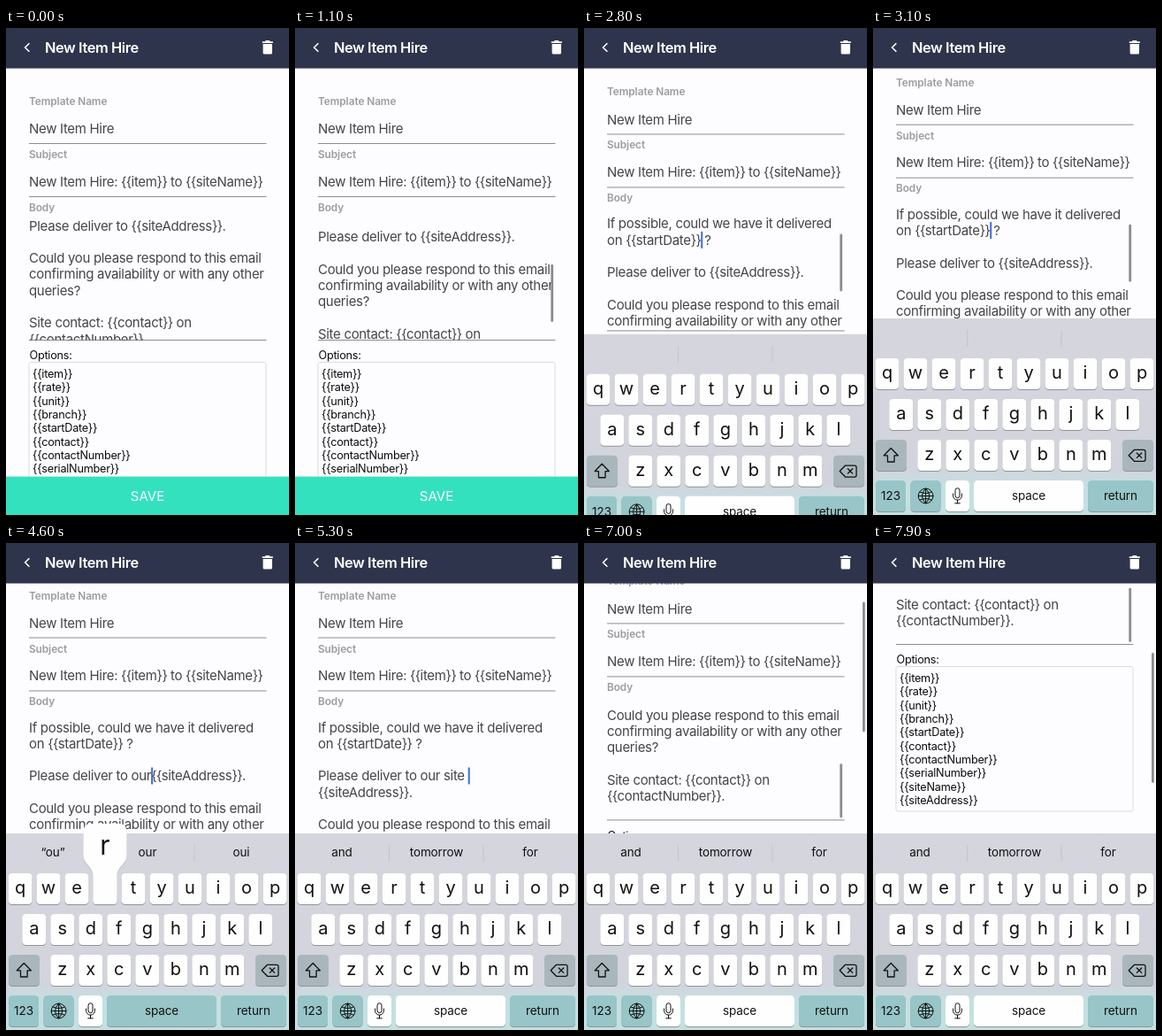
Animation of 320x550 px, one loop 8 s. Source, as an HTML page:

```html
<!DOCTYPE html>
<html lang="en">
<head>
<meta charset="utf-8">
<title>Edit template</title>
<style>
  html, body { margin: 0; width: 100%; height: 100%; overflow: hidden; background: #fdfcfe; }
  svg { display: block; width: 320px; height: 550px; }
  text { font-family: Inter, Roboto, sans-serif; white-space: pre; }
  .title { font-size: 16.4px; font-weight: 600; letter-spacing: -.42px; fill: #fff; }
  .label { font-size: 11.8px; font-weight: 600; letter-spacing: -.05px; fill: #9c9b9f; }
  .field { font-size: 15px; letter-spacing: -.32px; fill: #454447; }
  .field .brace { letter-spacing: -.62px; }
  .option { font-size: 12.7px; letter-spacing: -.25px; fill: #0c0c0d; }
  .save { font-size: 15px; fill: #fff; text-anchor: middle; }
  .key { font-size: 20px; fill: #111; text-anchor: middle; }
  .word { font-size: 13.5px; letter-spacing: -.1px; fill: #111; text-anchor: middle; }
  .big { font-size: 30px; fill: #111; text-anchor: middle; }
  .icon { fill: none; stroke: #111; stroke-width: 1.3; stroke-linejoin: round; stroke-linecap: round; }
  .thin { stroke-width: 1; }
</style>
</head>
<body>
<svg id="stage" viewBox="0 0 320 550">
  <defs>
    <clipPath id="bodyClip"><rect x="20" y="214.5" width="280" height="138"/></clipPath>
    <linearGradient id="board" x1="0" y1="328" x2="0" y2="550" gradientUnits="userSpaceOnUse">
      <stop offset="0" stop-color="#d5d5de"/>
      <stop offset=".76" stop-color="#d2d4dc"/>
      <stop offset=".85" stop-color="#c5dfe1"/>
      <stop offset="1" stop-color="#c3e1e1"/>
    </linearGradient>
  </defs>
  <rect width="320" height="550" fill="#fdfcfe"/>
  <g id="page">
    <g id="form"></g>
    <g clip-path="url(#bodyClip)">
      <g id="lines"></g>
      <rect id="caret" width="2" height="19" fill="#3d6be0"/>
    </g>
    <rect id="bodyBar" x="289.3" width="2.8" rx="1.4" fill="#8c8c8f"/>
  </g>
  <rect id="pageBar" x="315" width="2.8" height="147" rx="1.4" fill="#8c8c8f"/>
  <rect width="320" height="45.6" fill="#2e344b"/>
  <path d="M26.4 17.3l-4.8 4.7 4.8 4.7" fill="none" stroke="#fff" stroke-width="1.6"/>
  <text class="title" x="44" y="28">New Item Hire</text>
  <path d="M289.8 15.2h3l1-1.2h4l1 1.2h3v1.7h-12zM290.6 18h10.4v10q0 1.6-1.6 1.6h-7.2q-1.6 0-1.6-1.6z" fill="#fff"/>
  <rect y="506.6" width="320" height="43.4" fill="#34e1bf"/>
  <text class="save" x="160" y="534">SAVE</text>
  <g id="keyboard"></g>
</svg>
<script>
const LOOP = 8000, LINE = 18.3, TOP = 214, VIEW = 138;
const $ = id => document.getElementById(id);

function add(parent, tag, attrs, text) {
  const el = document.createElementNS('http://www.w3.org/2000/svg', tag);
  for (const k in attrs) el.setAttribute(k, attrs[k]);
  if (text !== undefined) el.textContent = text;
  parent.appendChild(el);
  return el;
}
const label = (parent, cls, x, y, text) => add(parent, 'text', { class: cls, x, y }, text);
const set = (el, attrs) => { for (const k in attrs) el.setAttribute(k, attrs[k]); };
const setText = (el, s) => { if (el.textContent !== s) el.textContent = s; };

// Field text sets its braces a little tighter
function setField(el, s) {
  if (el.textContent === s) return;
  el.textContent = '';
  for (const part of s.split(/(\{\{|\}\})/))
    if (part) add(el, 'tspan', /[{}]/.test(part) ? { class: 'brace' } : {}, part);
}
function field(parent, y, s) {
  const el = label(parent, 'field', 26, y, '');
  setField(el, s);
  return el;
}

// Form
const form = $('form');
[['Template Name', 87], ['Subject', 147], ['Body', 206.5]].forEach(([s, y]) => label(form, 'label', 26, y, s));
field(form, 119.2, 'New Item Hire');
field(form, 178.8, 'New Item Hire: {{item}} to {{siteName}}');
[130.5, 190.5, 352.5].forEach(y => add(form, 'path', { d: `M26 ${y}h268.5`, stroke: '#8d8c90' }));
label(form, 'option', 26.5, 374.3, 'Options:');
add(form, 'rect', { x: 26, y: 377.5, width: 268, height: 163.5, rx: 2, fill: 'none', stroke: '#dcdbdf' });
['item', 'rate', 'unit', 'branch', 'startDate', 'contact', 'contactNumber', 'serialNumber', 'siteName', 'siteAddress']
  .forEach((s, i) => label(form, 'option', 30, 394.8 + i * 15.35, `{{${s}}}`));

// Keyboard
const kb = $('keyboard');
const keys = {};
add(kb, 'rect', { y: 328, width: 320, height: 222, fill: 'url(#board)' });
[106.5, 213].forEach(x => add(kb, 'path', { d: `M${x} 341v19`, stroke: '#c3c5cd' }));
const words = [53, 160, 266].map(x => label(kb, 'word', x, 354.3, ''));

function key(x, y, w, fill = '#fefefe') {
  add(kb, 'rect', { x, y: y + 1, width: w, height: 35, rx: 4.3, fill: '#8f959b' });
  return add(kb, 'rect', { x, y, width: w, height: 35, rx: 4.3, fill });
}
[['qwertyuiop', 2.5, 373], ['asdfghjkl', 18.3, 419], ['zxcvbnm', 50.3, 465]].forEach(([row, x0, y]) =>
  [...row].forEach((ch, i) => {
    const x = x0 + i * 32;
    key(x, y, 27);
    label(kb, 'key', x + 13.5, y + 23.4, ch);
    keys[ch] = { x: x + 13.5, y };
  }));
const GREY = '#a9b7bd', TEAL = '#98c5c7';
key(3, 465, 35, GREY);
key(282, 465, 35, GREY);
key(3, 511, 34, TEAL);
key(42.5, 511, 34, TEAL);
key(82, 511, 27);
const space = key(114, 511, 124);
key(243, 511, 74, TEAL);
[[20, '123'], [176, 'space'], [280, 'return']].forEach(([x, s]) => label(kb, 'word', x, 533, s));
const icon = (d, cls = 'icon') => add(kb, 'path', { class: cls, d });
icon('M20.3 474.5l8 8.3h-4.2v7.2h-7.6v-7.2h-4.2z');
icon('M295.5 476.3h10.5q2 0 2 2v9q0 2-2 2h-10.5l-6.3-6.5zM298.3 480l5.4 5.4m0-5.4l-5.4 5.4');
icon('M51.2 528.5a8.4 8.4 0 0 1 16.8 0a8.4 8.4 0 0 1-16.8 0h16.8M59.6 520.1v16.8M59.6 520.1q-8.4 8.4 0 16.8' +
  'q8.4-8.4 0-16.8M53 524q6.6 3 13.2 0M53 533q6.6-3 13.2 0', 'icon thin');
icon('M93 522.2a2.5 2.5 0 0 1 5 0v6a2.5 2.5 0 0 1-5 0zM90.6 526v2.2a4.9 4.9 0 0 0 9.8 0v-2.2M95.5 533.2v3.6M92.7 536.8h5.6', 'icon thin');

const popup = add(kb, 'g', {});
const bubble = 'M-24.5-47q0-9 9-9h31q9 0 9 9v26c0 12-11 12-11 25v27q0 4-4 4h-19q-4 0-4-4v-27c0-13-11-13-11-25z';
add(popup, 'path', { d: bubble, fill: '#9a9fa6', opacity: .5, transform: 'translate(0 1.2)' });
add(popup, 'path', { d: bubble, fill: '#fefefe' });
const popChar = label(popup, 'big', 0, -21, '');

// Timeline: key, pressed at, released at
const typing = [['o', 4300, 4400], ['u', 4400, 4490], ['r', 4500, 4660], [' ', 4580, 4690],
  ['s', 4800, 4890], ['i', 4900, 4990], ['t', 5000, 5090], ['e', 5100, 5190], [' ', 5170, 5260]];
const enteredAt = ([ch, down, up]) => ch === ' ' ? up : down;
const hints = ['', '“o” of on', '“ou” our oui', '“ou” our oui', 'own house site', '“s” so see',
  '“si” since side', '“sit” site sitting', '“site” site sites', 'and tomorrow for'];

const clamp = u => Math.max(0, Math.min(1, u));
const linear = u => u, smooth = u => u * u * (3 - 2 * u);
const easeOut = u => 1 - (1 - u) ** 2, easeIn = u => u * u;

// Keyframes: [time, value, easing into it]
function track(frames, t) {
  let v = frames[0][1];
  for (let i = 1; i < frames.length; i++) {
    const [t0, a] = frames[i - 1], [t1, b, ease = smooth] = frames[i];
    if (t >= t0) v = a + (b - a) * ease(clamp((t - t0) / (t1 - t0)));
  }
  return v;
}
const pageY = [[2700, 0], [3050, 21.3, easeOut], [3150, 21.3], [3300, 23.5]];
pageY.push([6850, 23.5], [7750, 238]);
const bodyY = [[700, 128], [1000, 120, easeIn], [1900, 80, linear], [2350, 64.6, easeOut],
  [5800, 64.6], [6600, 190], [7000, 172]];
const boardY = [[2550, 222], [2900, 0, easeOut]];
const bodyBarFade = [[600, 0], [750, 1], [3250, 1], [3500, 0], [5750, 0], [5900, 1]];
const pageBarFade = [[6800, 0], [6950, 1]];

// Lines above these are always scrolled out of view
const FIRST = 4;
function bodyLines(typed) {
  const text = 'Please deliver to ' + typed + '{{siteAddress}}.';
  const cut = typed.length < 8 ? text.length : 18 + (typed.length === 8 ? 4 : typed.length);
  const lines = ['If possible, could we have it delivered', 'on {{startDate}} ?', '', text.slice(0, cut)];
  if (cut < text.length) lines.push(text.slice(cut));
  lines.push('', 'Could you please respond to this email', 'confirming availability or with any other',
    'queries?', '', 'Site contact: {{contact}} on', '{{contactNumber}}.');
  const col = 18 + typed.length;
  return { lines, caret: col > cut ? [4, col - cut] : [3, col] };
}
const rows = Array.from({ length: 12 }, () => field($('lines'), 0, ''));

function drawBody(t) {
  const done = typing.filter(k => t >= enteredAt(k));
  const { lines, caret } = bodyLines(done.map(k => k[0]).join(''));
  const scroll = track(bodyY, t);
  const top = i => TOP + (FIRST + i) * LINE - scroll;
  rows.forEach((el, i) => {
    setField(el, lines[i] || '');
    set(el, { y: top(i) + 14.4 });
  });

  const [row, col] = t < 3700 ? [1, 16] : caret;
  const last = done.length ? enteredAt(done[done.length - 1]) : t < 3700 ? 2700 : 3700;
  const on = t >= 2700 && (t - last) % 1000 < 600;
  set($('caret'), {
    x: 26 + rows[row].getSubStringLength(0, col), y: top(row) - .5,
    visibility: on ? 'visible' : 'hidden'
  });

  const total = (FIRST + lines.length + 1) * LINE;
  const over = Math.max(0, scroll - (total - VIEW));
  const h = VIEW * VIEW / total - over;
  set($('bodyBar'), {
    y: Math.min(TOP - 1.5 + scroll * VIEW / total, TOP + VIEW - h - 1), height: h,
    opacity: track(bodyBarFade, t)
  });
  return done.length;
}

function drawKeyboard(t, count) {
  set(kb, { transform: `translate(0 ${track(boardY, t)})`, visibility: t > 2550 ? 'visible' : 'hidden' });
  const hint = hints[count].split(' ');
  words.forEach((el, i) => setText(el, hint[i] || ''));
  const held = typing.filter(([, down, up]) => t >= down && t < up).map(k => k[0]);
  set(space, { fill: held.includes(' ') ? TEAL : '#fefefe' });
  const ch = held.find(c => c !== ' ');
  popup.style.display = ch ? '' : 'none';
  if (ch) {
    set(popup, { transform: `translate(${keys[ch].x} ${keys[ch].y})` });
    setText(popChar, ch);
  }
}

function draw(t) {
  const offset = track(pageY, t);
  set($('page'), { transform: `translate(0 ${-offset})` });
  set($('pageBar'), { y: 55 + offset * .29, opacity: track(pageBarFade, t) });
  drawKeyboard(t, drawBody(t));
}

const start = performance.now();
function tick() {
  draw((performance.now() - start) % LOOP);
  requestAnimationFrame(tick);
}
tick();
</script>
</body>
</html>
```
